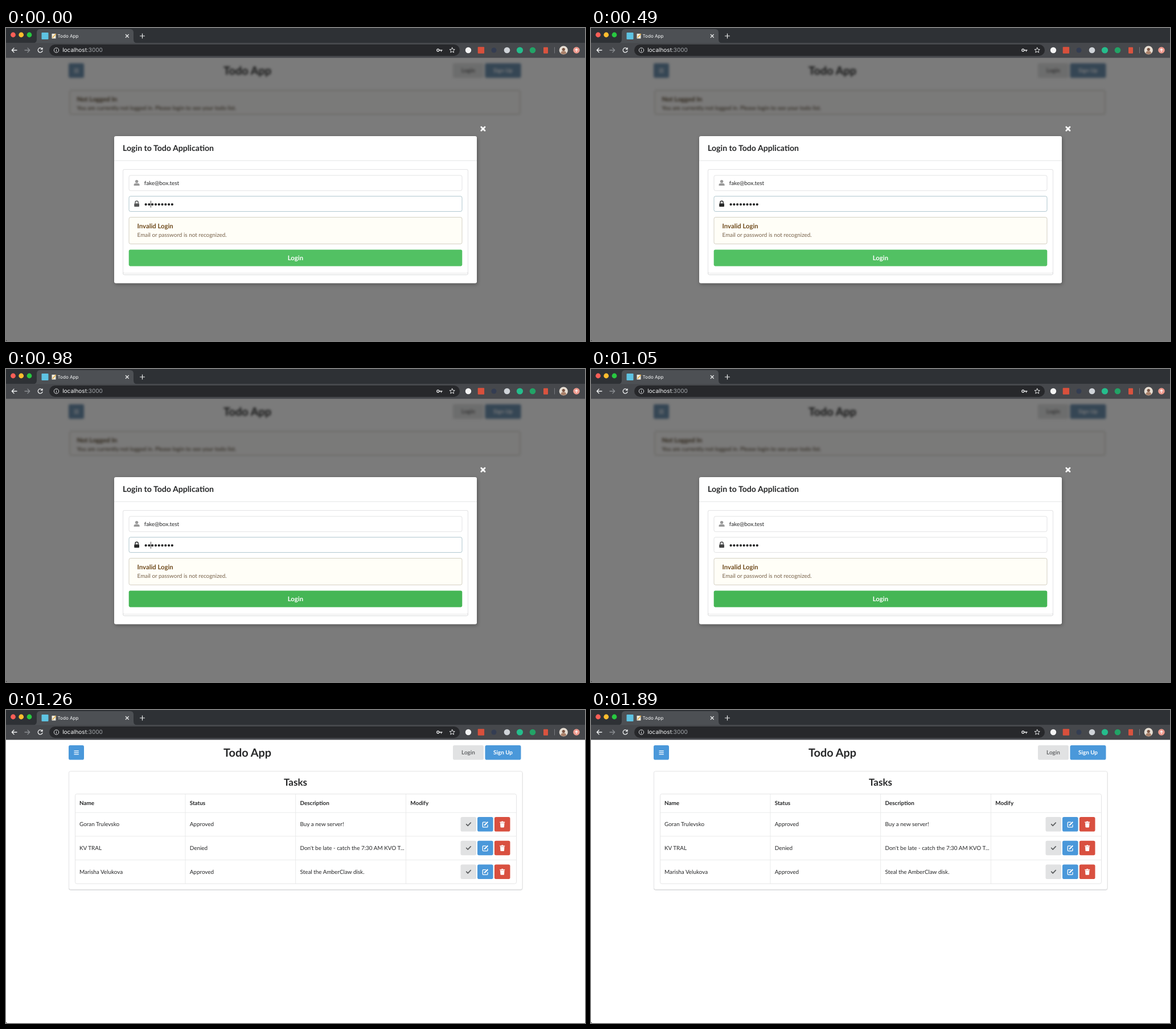
Write an HTML page that moves like this. It is 1017 px wide and 550 px high and loops after 1.96 s.

```html
<!DOCTYPE html>
<html lang="en">
<head>
<meta charset="utf-8">
<title>Todo App</title>
<style>
html, body { margin: 0; height: 100%; overflow: hidden; background: #fff; }
svg { display: block; width: 100vw; height: 100vh; }
text { font: 9.92px Lato, sans-serif; fill: #262728; text-rendering: geometricPrecision; }
.ui { font-family: Inter, sans-serif; }
.line { fill: none; stroke-linecap: round; stroke-linejoin: round; }
#behind { filter: blur(2.3px) grayscale(.55); }
#modalBox { filter: drop-shadow(1px 2px 3px rgba(0,0,0,.3)); }
</style>
</head>
<body>
<svg id="stage" viewBox="0 0 1017 550" xmlns="http://www.w3.org/2000/svg"></svg>
<script>
const BLUE = '#4a98da', RED = '#d95040', INK = '#262728', RULE = '#e2e3e4';

const box = (x, y, w, h, fill, r = 0, more = '') =>
  `<rect x="${x}" y="${y}" width="${w}" height="${h}" rx="${r}" fill="${fill}" ${more}/>`;
const frame = (x, y, w, h, stroke, fill = '#fff', more = '') =>
  box(x, y, w, h, fill, 2.8, `stroke="${stroke}" stroke-width=".9" ${more}`);
const dot = (x, y, r, fill, more = '') =>
  `<circle cx="${x}" cy="${y}" r="${r}" fill="${fill}" ${more}/>`;
const shape = (d, fill) => `<path d="${d}" fill="${fill}"/>`;
const line = (d, color, w = 1) =>
  `<path class="line" d="${d}" stroke="${color}" stroke-width="${w}"/>`;
const text = (x, y, s, { size = 9.92, bold, color = INK, mid, ui } = {}) =>
  `<text x="${x}" y="${y}" class="${ui ? 'ui' : ''}" style="font-size:${size}px;fill:${color};` +
  `font-weight:${bold ? 700 : 400}" text-anchor="${mid ? 'middle' : 'start'}">${s}</text>`;

const browser = () =>
  box(0, 0, 1017, 27, '#2e3135') + box(0, 26, 1017, 26.4, '#46484c') +
  shape('M48 26.5Q54 26 54 20V8Q54 2 60 2H218Q224 2 224 8V20Q224 26 230 26.5Z', '#4d5054') +
  dot(12.5, 12, 4.4, '#fc5f57') + dot(26.7, 12, 4.4, '#fdbd2e') + dot(41, 12, 4.4, '#28c840') +
  box(62.5, 8, 12, 12, '#5ec3e2', 1) +
  box(80.5, 10, 7, 8.5, '#eeeadd', .5) + line('M82 16.5L87.5 10.5', '#e0a83c', 1.4) +
  text(90.5, 17, 'Todo App', { size: 8.1, color: '#f3f4f5', ui: 1 }) +
  line('M210.3 11.5L215.3 16.5M215.3 11.5L210.3 16.5M235.5 14H243.5M239.5 10V18', '#eceded', 1.2) +
  line('M19 39H10.5M14 35.2L10.3 39L14 42.8', '#f0f1f2', 1.3) +
  line('M33 39H41.5M38 35.2L41.7 39L38 42.8', '#8a8d91', 1.3) +
  line('M63.6 36.8A4 4 0 1 0 64 40.2M64 34.9V37.4H61.4', '#f0f1f2', 1.3) +
  box(76, 29, 721, 20, '#27282b', 10) +
  dot(88.5, 39, 4.2, 'none', 'stroke="#dfe1e3"') + line('M88.5 38.8V41M88.5 36.8V36.9', '#dfe1e3') +
  `<text class="ui" x="99.2" y="42.4" style="font-size:10px;fill:#f3f4f5">localhost` +
  `<tspan fill="#a2a6aa">:3000</tspan></text>` +
  dot(758.8, 39, 2, 'none', 'stroke="#e3e4e5" stroke-width="1.3"') +
  line('M761 39H766M764.5 39V41', '#e3e4e5', 1.3) +
  line('M783.7 34.3L785 37.4L788.3 37.7L785.8 39.9L786.6 43.1L783.7 41.4L780.8 43.1L781.6 39.9L779.1 37.7L782.4 37.4Z', '#e3e4e5') +
  dot(812, 39, 5.2, '#f4f4f4') + box(828.7, 33.3, 11.4, 11.4, '#d8503c', 1) +
  dot(857, 39, 4.5, '#343d52') + dot(880, 39, 5.3, '#cfd3d8') + dot(902.5, 39, 5.6, '#25bd8c') +
  dot(925, 39, 5.3, '#22a366') + box(944, 33.7, 8, 11, '#d9533f', 1) +
  line('M963.5 34V44', '#777a7e') +
  dot(979.3, 39, 7.6, '#e6ddd2') + dot(979.3, 37.5, 2.6, '#7b5544') +
  shape('M974.3 44.6Q975 40.2 979.3 40.2T984.3 44.6Q979.3 48 974.3 44.6Z', '#a98069') +
  dot(1002, 39, 5.8, '#ee9a8e') + line('M1002 41.5V37M1000 38.7L1002 36.7L1004 38.7', '#fff', 1.2);

const header = () =>
  box(110, 62, 27, 25.6, BLUE, 2.8) +
  line('M120 71.9H127.3M120 74.9H127.3M120 77.9H127.3', '#fff', 1.3) +
  text(424, 82.2, 'Todo App', { size: 19.84, bold: 1, mid: 1 }) +
  box(785, 62, 54, 25.6, '#e1e2e3', 2.8) +
  text(812, 78.4, 'Login', { bold: 1, mid: 1, color: '#66686a' }) +
  box(841.5, 62, 63, 25.6, BLUE, 2.8) +
  text(873, 78.4, 'Sign Up', { bold: 1, mid: 1, color: '#fff' });

const notice = () =>
  frame(112, 109.5, 791, 42, '#c9ba9b', '#fffdfa') +
  text(124.5, 128.5, 'Not Logged In', { size: 11.3, bold: 1, color: '#69430d' }) +
  text(124.5, 144, 'You are currently not logged in. Please login to see your todo list.', { color: '#573a08' });

const actions = y =>
  box(798.5, y, 27.5, 25.6, '#e1e2e3', 2.8) +
  line(`M808.7 ${y + 12.8}l2.5 2.6l5 -5.2`, '#5e6062', 1.8) +
  box(828, y, 27.6, 25.6, BLUE, 2.8) +
  line(`M842.5 ${y + 9.2}h-4.2q-1 0 -1 1v6.7q0 1 1 1h6.7q1 0 1 -1v-3`, '#fff', 1.3) +
  line(`M840.7 ${y + 14.3}l5 -5`, '#fff', 2.2) +
  box(857.9, y, 27.6, 25.6, RED, 2.8) +
  shape(`M867.3 ${y + 8.6}h2.7l.6 -1h2.3l.6 1h2.7v1.4h-8.9zM868 ${y + 10.6}h7.5l-.5 7q-.1 .8 -.9 .8h-4.7q-.8 0 -.9 -.8z`, '#fff');

const columns = [129, 322.7, 516.5, 710.3];
const tasks = [
  ['Goran Trulevsko', 'Approved', 'Buy a new server!'],
  ['KV TRAL', 'Denied', 'Don\'t be late - catch the 7:30 AM KVO T...'],
  ['Marisha Velukova', 'Approved', 'Steal the AmberClaw disk.']
];
const row = (cells, y, bold) => cells.map((s, i) => text(columns[i], y, s, { bold })).join('');
const table = () =>
  frame(110.5, 108.2, 796.5, 208, '#cfd0d1', '#dcddde') + frame(110.5, 107.6, 796.5, 207.8, RULE) +
  text(508.5, 132.5, 'Tasks', { size: 17, bold: 1, mid: 1 }) +
  frame(121.5, 147.6, 775, 157.6, RULE) +
  line('M315 148V305M508.7 148V305M702.5 148V305M122 180.2H896M122 221.8H896M122 263.5H896', '#e8e9e9', .9) +
  row(['Name', 'Status', 'Description', 'Modify'], 167.2, 1) +
  tasks.map((t, i) => row(t, 204.2 + i * 41.7) + actions(188 + i * 41.7)).join('');

const modal = () =>
  line('M834.8 174L841 180.2M841 174L834.8 180.2', '#fff', 2.8) +
  box(190, 190, 637, 258.4, '#fff', 3, 'id="modalBox"') +
  text(205, 216.2, 'Login to Todo Application', { size: 14.17, bold: 1 }) +
  line('M190.5 233H826.5', '#e0e1e2', .9) +
  frame(205.5, 248.5, 606, 185.2, '#d4d5d6') + frame(205.5, 248.5, 606, 182.4, RULE) +
  frame(216, 259, 585, 26.8, '#dfe0e1') +
  dot(229.6, 269.8, 2.7, '#999') +
  shape('M224.6 277V275.6Q224.6 273 227.2 273H232Q234.6 273 234.6 275.6V277Z', '#999') +
  text(242.7, 276.3, 'fake@box.test') +
  frame(216, 295.6, 585, 26.8, '#dfe0e1', '#fff', 'id="field"') +
  `<g id="lock">${box(225.2, 308.2, 8.8, 5.8, INK, .9)}${line('M227 308V306.6a2.6 2.6 0 0 1 5.2 0V308', INK, 1.4)}</g>` +
  Array.from({ length: 9 }, (_, i) => dot(245.6 + i * 5.78, 310, 2.1, '#1c1d1e')).join('') +
  box(253.9, 303.6, .9, 12, '#333', 0, 'id="caret"') +
  frame(216, 332.6, 585, 46.8, '#cfcabd', '#fffef7') +
  text(230.6, 352, 'Invalid Login', { size: 11.3, bold: 1, color: '#6f4a1c' }) +
  text(230.6, 366.8, 'Email or password is not recognized.', { color: '#78624a' }) +
  box(215.7, 389.6, 585.6, 28.8, '#52c163', 2.8, 'id="submit"') +
  text(508.4, 408.4, 'Login', { size: 11.34, bold: 1, mid: 1, color: '#fff' });

const $ = id => document.getElementById(id);
$('stage').innerHTML =
  box(0, 0, 1017, 550, '#fff') +
  `<g id="list">${header()}${table()}</g>` +
  `<g id="login"><g id="behind">${header()}${notice()}</g>` +
  `${box(0, 52, 1017, 498, 'rgba(0,0,0,.518)')}${modal()}</g>` +
  browser() + shape('M0 548V550H2Q.5 549.5 0 548Z', '#333');

const LOOP = 1960, STEP = 70, HOVER = 770, PRESS = 1050, LOGGED_IN = 1260;
const ramp = (t, from, length) => Math.min(1, Math.max(0, (t - from) / length));
const mix = (a, b, k) => `rgb(${a.map((v, i) => Math.round(v + (b[i] - v) * k))})`;
const idle = [82, 193, 99], hover = [69, 182, 85], active = [66, 155, 80];

function draw(now) {
  const t = Math.floor(now % LOOP / STEP) * STEP;
  const focused = t < PRESS;
  $('login').style.display = t < LOGGED_IN ? '' : 'none';
  $('list').style.display = t < LOGGED_IN ? 'none' : '';
  $('caret').style.display = focused && (t < 420 || t >= 910) ? '' : 'none';
  $('lock').style.opacity = focused ? .78 + .22 * ramp(t, 0, 210) : 1 - .5 * ramp(t, PRESS - STEP, 280);
  $('field').style.stroke = focused ? '#a5c0c9' : '#dfe0e1';
  $('submit').style.fill = focused
    ? mix(idle, hover, ramp(t, HOVER, 100))
    : mix(hover, active, ramp(t, PRESS, 100));
  requestAnimationFrame(draw);
}
requestAnimationFrame(draw);
</script>
</body>
</html>
```
